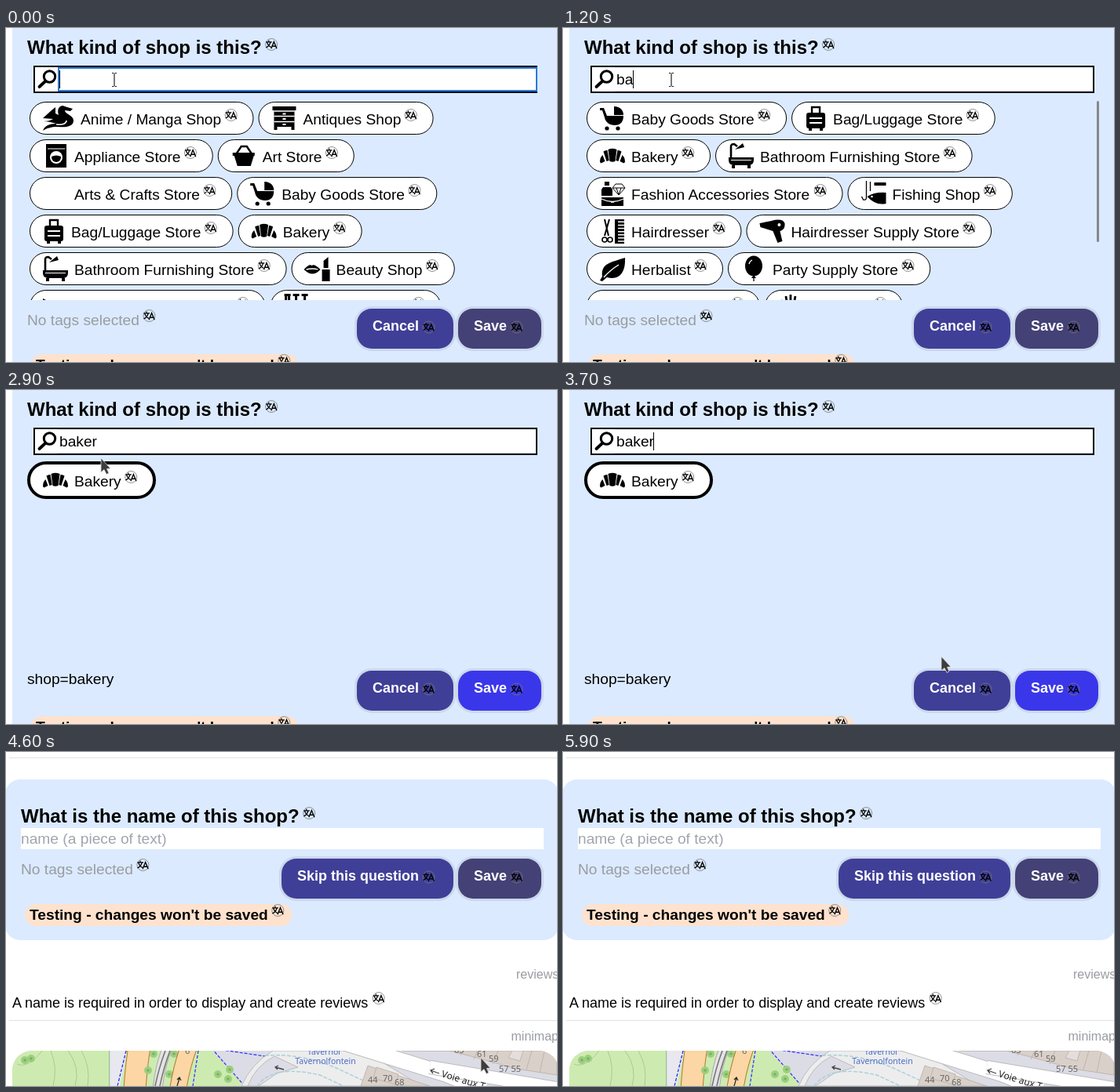
Animation of 702 by 426 pixels, one loop 6400 ms. Source, as an HTML page:

```html
<!DOCTYPE html>
<html lang="en">
<head>
<meta charset="utf-8">
<title>Picking a shop type</title>
<style>
html, body { margin: 0; width: 100%; height: 100%; overflow: hidden; background: #fff; }
svg { display: block; width: 702px; height: 426px; font-family: "Liberation Sans", Arial, sans-serif; }
text { white-space: pre; }
</style>
</head>
<body>
<svg id="stage" viewBox="0 0 702 426" xmlns="http://www.w3.org/2000/svg"></svg>
<script>
const LOOP = 6400, BODY = 19.2, BLUE = '#dbeafe', GREY = '#999ca1';
const ctx = document.createElement('canvas').getContext('2d');

function textWidth(s, size, weight = 400) {
  ctx.font = `${weight} ${size}px "Liberation Sans", Arial, sans-serif`;
  return ctx.measureText(s).width;
}
const text = (s, x, y, size = BODY, attrs = '') =>
  `<text x="${x}" y="${y}" font-size="${size}" ${attrs}>${s.replace('&', '&amp;')}</text>`;
const rect = (x, y, w, h, fill, r = 0, more = '') =>
  `<rect x="${x}" y="${y}" width="${w}" height="${h}" rx="${r}" fill="${fill}" ${more}/>`;
const path = (d, attrs = '') => `<path d="${d}" ${attrs}/>`;
const line = (d, color, w = 1, more = '') =>
  path(d, `fill="none" stroke="${color}" stroke-width="${w}" ${more}`);
const dot = (x, y, r, fill = '#000', more = '') =>
  `<circle cx="${x}" cy="${y}" r="${r}" fill="${fill}" ${more}/>`;
const group = (id, s, attrs = '') => `<g id="${id}" ${attrs}>${s}</g>`;
const move = (x, y, s) => `<g transform="translate(${x} ${y})">${s}</g>`;

// Language badge
const badge = (x, y) => move(x, y,
  dot(0, 0, 7.5, 'none', 'stroke="#777" stroke-width=".8"') +
  line('M-7-3.2H.6M-3.4-5.6V-3.2M-1.2-3Q-2.6 2-7 4M-5.8-3Q-4 2-.4 3.4', '#000', 1.2) +
  line('M-.3 5.2 3.2-3.4 6.8 5.2M1 2.2H5.5', '#000', 1.4));

function label(s, x, y, size = BODY, weight = 400, fill = '#000', dy = -12) {
  return text(s, x, y, size, `font-weight="${weight}" fill="${fill}"`) +
    badge(x + textWidth(s, size, weight) + 12.5, y + dy);
}

const button = (s, x, y, w, fill, id = '') =>
  rect(x - 3, y - 3, w + 6, 57, '#cbd8ec', 22, id && `id="${id}Ring"`) +
  rect(x, y, w, 51, fill, 19, id && `id="${id}"`) +
  label(s, x + 20, y + 28, 18, 700, '#fff', -4.5);

const notice = (x, y) => rect(x, y, 340, 28, '#fee2ce', 14) +
  label("Testing - changes won't be saved", x + 6, y + 20, BODY, 700);

// Shop icons in a 32 by 32 box
const white = (d, w = 1.5) => line(d, '#fff', w);
const ink = (d, w = 2) => line(d, '#000', w);
const icons = {
  dragon: path('M0 16 11 6l5-4 0 8 4 2c-2-7 0-11 5-12l6 2 7 2-3 3-7-1c0 5 11 6 11 13 0 8-10 9-20 8-8 0-15 2-19 5 2-6 8-9 17-9-6-2-12-3-16-3 5 0 9-1 12-3z') + white('M17 24q13 1 13-5'),
  drawers: path('M1 1h30v5H1zM3 6h26v21H3zM3 27h4v4H3zM25 27h4v4h-4z') + white('M3 7h26M3 13.5h26M3 20.5h26') + white('M14 10.5h4M14 17h4M14 24h4', 2),
  washer: path('M4 1h26v30H4z') + white('M6 7h22', 1) + dot(17, 18, 8, '#fff') + dot(17, 18, 6) + path('M11 17q6-3 12 0a6 6 0 0 0-12 0z', 'fill="#fff"'),
  basket: path('M2 12h28v4h-1l-4 13H8L4 16H2z') + ink('M7 13 13 4h7l6 9', 2.4),
  pram: path('M0 3h5l4 10h21c0 8-4 12-11 12s-12-4-13-10L3 6H0zM18 12V1c8 0 12 5 12 11z') + dot(9, 29, 2.6) + dot(23, 29, 2.6),
  luggage: rect(2, 9, 24, 20, '#000', 3) + ink('M9 9V2h10v7', 2.4) + white('M6 16h16M6 22h16', 1.8) + path('M5 28h4v4H5zM19 28h4v4h-4z'),
  croissant: path('M10.5 8q5.5-2.6 11 0l-2 15q-3.500 1.500-7 0zM4.500 10.500q2.500-2 5-1.500l2.200 13-3.200 1zM27.500 10.500q-2.500-2-5-1.500l-2.200 13 3.200 1zM0 24q0-6 3.500-9l3 8-5 2.500zM32 24q0-6-3.500-9l-3 8 5 2.500z'),
  bath: path('M0 18h32v3c0 5-3 7-6 7H7c-4 0-7-2-7-7zM4 28h4v4H4zM24 28h4v4h-4zM8 8 18 0l2 5z') + ink('M3 19V4q0-3 4-3l4 3', 2.6) + white('M3 21.5h26', 1),
  lips: path('M-1 17q7-8 10-5q3-3 11 5q-10 11-21 0zM22 17h10v15H22zM24 15V6l6-5v14z') + white('M2 17q8-2 15 0', 1.3),
  fashion: path('M4 8h10l2 3v8H2v-8zM6 1h6v5H6zM2 21h28v11H2z') + ink('M16 9l4-5h8l4 5-8 9zM16 9h16M21 9l3 9 3-9', 1) + white('M2 23q14 7 28 0M14 27h4', 1.3),
  fishing: ink('M7 0v21q0 4-4 3l-2-4M12 1v12', 1.3) + path('M17 2h15v4H17zM8 20q9-6 24-5v14q-13 3-24-9z') + dot(14, 20, 1.3, '#fff'),
  scissors: ink('M6 1 11 22M12 1 6 22', 2) + ink('M3 27a3 3 0 1 1 6 0a3 3 0 1 1-6 0M10 27a3 3 0 1 1 6 0a3 3 0 1 1-6 0', 1.6) + path('M19 1h4v31h-4z') + line('M27 1v31', '#000', 8, 'stroke-dasharray="2.6 1.500"'),
  dryer: path('M0 6 15 3q14-4 17 3 1 8-6 10l3 13-6 2-6-15-16-5z') + dot(25, 8, 2, '#fff'),
  leaf: path('M3 26C1 9 14 8 32 2c1 20-8 29-23 25l-6 5-3-1z') + white('M5 27Q14 17 24 11', 1.4),
  balloon: '<ellipse cx="16" cy="12.500" rx="11" ry="13"/>' + path('M13 28l3-4 3 4z') + ink('M16 27v5', 1.3) + white('M10 10q1-4 4-5', 1.3),
  spout: path('M0 6l4 2 8 3-6 2H0z'),
  tubes: path('M1 0h8v3H1zM12 0h8v3h-8zM23 0h8v3h-8z') + ink('M3 2v20M7 2v20M16 2v20M27 2v20', 3),
  hand: ink('M4 8l6 14M10 3l3 18M16 1v20M22 3l-3 18', 2.8)
};

// Each shop: name, icon, text offset
const shops = {
  anime: ['Anime / Manga Shop', 'dragon', 65], antiques: ['Antiques Shop', 'drawers'],
  appliance: ['Appliance Store', 'washer'], art: ['Art Store', 'basket'],
  crafts: ['Arts & Crafts Store', ''], baby: ['Baby Goods Store', 'pram'],
  bag: ['Bag/Luggage Store', 'luggage', 53], bakery: ['Bakery', 'croissant'],
  bath: ['Bathroom Furnishing Store', 'bath'], beauty: ['Beauty Shop', 'lips'],
  fashion: ['Fashion Accessories Store', 'fashion'], fishing: ['Fishing Shop', 'fishing'],
  hair: ['Hairdresser', 'scissors'], supply: ['Hairdresser Supply Store', 'dryer'],
  herbs: ['Herbalist', 'leaf'], party: ['Party Supply Store', 'balloon'],
  boat: ['Bookbinding Workshop.', 'spout'], brew: ['Brewing Tools', 'tubes'],
  perfume: ['Perfume Shop', ''], massage: ['Massage', 'hand']
};
function pill(key, x, y, thick) {
  const [name, icon, dx = 57] = shops[key];
  const w = dx + textWidth(name, BODY) + 41.3;
  const box = thick
    ? rect(x - 1, y - 1, w + 2, 44, '#fff', 22, 'stroke="#000" stroke-width="4"')
    : rect(x + .5, y + .5, w - 1, 41, '#fff', 20.5, 'stroke="#000"');
  return { w, svg: box + move(x + 17, y + 5, icons[icon] || '') + label(name, x + dx, y + 29) };
}
function list(id, rows) {
  let out = '';
  rows.forEach((row, i) => {
    let x = 30;
    for (const key of row.split(' ')) {
      const p = pill(key, x, 94 + 48 * i);
      out += p.svg;
      x += p.w + 6;
    }
  });
  return group(id, out, 'clip-path="url(#listClip)"');
}
const lists = {
  all: ['anime antiques', 'appliance art', 'crafts baby', 'bag bakery', 'bath beauty', 'boat brew'],
  b: ['baby bag', 'bakery bath', 'beauty fashion', 'fishing hair', 'supply', 'herbs party'],
  ba: ['baby bag', 'bakery bath', 'fashion fishing', 'hair supply', 'herbs party', 'perfume massage'],
  bak: ['bakery']
};

const typePage = group('typePage',
  rect(0, 0, 702, 426, '#fff') + rect(8, 0, 694, 426, BLUE) +
  label('What kind of shop is this?', 27, 33, 24, 700) +
  rect(36, 49, 640, 33, '#fff', 0, 'stroke="#000" stroke-width="2"') +
  line('M66 51H675M66 80.500H675', '#dfe6f0') +
  group('ring', rect(67, 51, 609, 29, '#fff', 0, 'stroke="#2a78d6" stroke-width="2"')) +
  dot(55.5, 62, 7.2, 'none', 'stroke="#000" stroke-width="3"') +
  line('M50 68 42.500 75', '#000', 3.8, 'stroke-linecap="round"') +
  text('', 68, 72, BODY, 'id="query"') + rect(68, 54, 1, 23, '#000', 0, 'id="caret"') +
  Object.entries(lists).map(([k, rows]) => list('list_' + k, rows)).join('') +
  group('chosen', pill('bakery', 30, 94, true).svg + text('shop=bakery', 27, 375)) +
  rect(680, 93, 3, 180, '#85888d', 1.5, 'id="bar"') +
  group('none', label('No tags selected', 27, 379, BODY, 400, GREY)) +
  button('Cancel', 447, 358, 123, '#403f98') + button('Save', 576, 358, 106, '#444176', 'save') +
  notice(32, 416));

// Small map
const tree = (x, y) => dot(x, y, 5, '#9bcf7f') + dot(x, y, 1.8, '#7fae62');
const number = (s, x, y) => text(s, x, y, 11, 'fill="#666" font-family="Noto Sans, sans-serif"');
const road = (d, w, fill, edge) => line(d, edge, w) + line(d, fill, w - 2);
const place = 'fill="#4c6cc8" text-anchor="middle" font-family="Noto Sans, sans-serif"';
const house = (d, fill = '#d9d0c9') => path(d, `fill="${fill}" stroke="#b9aea4" stroke-width=".8"`);
const minimap = group('minimap',
  rect(8, 381, 694, 45, '#dcdce6') +
  path('M8 381H131V426H8z', 'fill="#cdebb0"') +
  line('M57 381Q66 402 60 426M79 381Q95 402 88 426M96 381Q108 402 104 426M14 398Q28 404 46 381', '#a9bd8b', .8) +
  tree(24, 393) + tree(32, 391) + line('M131.500 381V426', '#8fc58f') +
  path('M133 381H157L147 426H133z', 'fill="#e8e8ee"') +
  path('M154 381H245L238 426H145z', 'fill="#cdebb0"') +
  line('M153 381 142 426', '#2a2aff', 1.3, 'stroke-dasharray="4 2"') +
  road('M170 376 Q166 400 164 431', 29, '#fcd6a4', '#b07a2a') +
  tree(188, 385) + tree(181, 406) + tree(208, 411) + tree(214, 385) +
  road('M206 376Q196 400 193 431', 13, '#e4e4e4', '#aaa') +
  line('M203 381Q195 402 190 426M209 381Q201 402 196 426', '#777', 1.6) +
  road('M233 376Q224 400 219 431', 22, '#fcd6a4', '#b07a2a') +
  line('M218 426 221 416M218 418l3-3 2 4', '#222', 1.2) + number('6', 228, 385) +
  path('M245 381H262L300 420V426H238z', 'fill="#cdebb0"') +
  line('M245 381 238 426M262 378 304 426M262 378 330 388', '#2a2aff', 1.2, 'stroke-dasharray="4 2"') +
  tree(270, 411) + tree(285, 405) + tree(283, 417) +
  path('M340 381H455L530 426H300Q312 398 340 381z', 'fill="#ededed" stroke="#bbb"') +
  path('M342 388 372 402 345 410 322 426H308Q318 400 342 388z', 'fill="#dcdce6" stroke="#bbb"') +
  line('M330 387Q380 384 425 405L470 426M320 426Q340 398 400 412L430 426', '#a5d0d8', 1.4, 'stroke-dasharray="5 2"') +
  line('M343 402 354 405M347 400l-4 2 3 3', '#444', 1.3) +
  house('M452 426 461 400 540 426z') + house('M472 402 500 411 496 424 468 416z') +
  house('M505 381H702V412L650 404 600 390 565 381z') +
  house('M640 390 645 381H659L655 394z', '#e3dedb') +
  line('M583 381 579 387M601 381 596 392M627 381 620 398M670 381 663 405M686 381 680 409', '#b9aea4', .8) +
  road('M425 369 560 411 610 431', 21, '#fff', '#bbb') + road('M540 402 720 432', 18, '#fff', '#bbb') +
  line('M541 406 552 410M546 404l-5 2 3 4', '#444', 1.3) +
  text('Tavernol', 405, 386, 10.5, place) + text('Tavernolfontein', 407, 398, 10.5, place) +
  number('44', 461, 422) + number('70', 480, 420) + number('68', 495, 425) + number('63', 571, 384) +
  number('61', 600, 389) + number('59', 615, 395) + number('57 55', 628, 408) +
  text('Voie aux T', 554, 414, 12, 'transform="rotate(17 554 414)" font-family="Noto Sans, sans-serif" fill="#222"'),
  'clip-path="url(#mapClip)"');

const namePage = group('namePage',
  rect(0, 0, 702, 426, '#fff') + line('M4 7.500H702M4 342.500H702', '#e2e2e2') +
  rect(-1, 35, 705, 205, BLUE, 19) +
  label('What is the name of this shop?', 19, 90, 24, 700) +
  rect(19, 97, 666, 27, '#fff') + text('name (a piece of text)', 19, 117, BODY, 'fill="#a0a5ad"') +
  label('No tags selected', 19, 156, BODY, 400, GREY) +
  button('Skip this question', 351, 136, 219, '#403f98') + button('Save', 576, 136, 106, '#444176') +
  notice(24, 194) +
  text('reviews', 650, 289, 16, `fill="${GREY}"`) +
  label('A name is required in order to display and create reviews', 8, 326, 18) +
  text('minimap', 643.5, 368, 16, `fill="${GREY}"`) + minimap);

// Large street map seen while the panel fades in
const street = (s, x, y, size, turn) => text(s, x, y, size,
  `transform="rotate(${turn} ${x} ${y})" font-family="Noto Sans, sans-serif" fill="#333"`);
const bigMap = group('bigMap',
  rect(0, 0, 702, 426, '#f4f2ee') +
  path('M0 240 Q70 225 110 70Q130 40 200 50L702 190V426H0z', 'fill="#fbfaf2"') +
  line('M0 260Q75 240 92 100Q100 45 200 50L380 115 412 18 640 95 702 112', '#bbb', 4) +
  path('M60 426 118 235Q125 222 190 226L702 395V426z', 'fill="#ebe5df" stroke="#bbb" stroke-width="4"') +
  path('M190 426 235 295 560 400 552 426z', 'fill="#dfd6cf"') +
  line('M90 102Q130 80 230 105L702 235M190 95 702 183', '#8fc4f5', 6, 'stroke-dasharray="19 11"') +
  line('M12 147 42 151M52 157 76 155M86 164 96 167', '#5a4fd0', 6, 'stroke-dasharray="8 4"') +
  dot(500, 12, 29, '#bfe0a0') + dot(500, 12, 6, '#c7a878') + dot(605, 48, 28, '#bfe0a0') + dot(605, 48, 6, '#c7a878') +
  line('M195 174H152M168 165 152 174 168 183', '#777', 7) +
  street('Place de Hulvane - Hulvaanseplein', 213, 191, 48, 18.5) +
  street('Hulvaan', 615, 74, 42, 5) + street('Hul', 672, 18, 42, 5) +
  path('M132 308H153V330H132zM129 306 142 300 156 306z', 'fill="#555"') + path('M690 106h12v30h-12z', 'fill="#555"'));

const arrow = path('M0 0V18L4 14.500 7 20.500 10 19 7.500 13.500 12 13z', 'fill="#3d3d3d" stroke="#ddd" stroke-width=".8"');
const pointer = path('M-2 1Q0-1 2 1L4 8Q7 6 8 8 11 7 11.500 9 14 8 14 11L13 20H3Q-3 16-6 11-5 8-2 11L0 12z', 'fill="#444" stroke="#ddd" stroke-width=".8"');
const beam = line('M-3-8.500H3M-3 8.500H3M0-8.500V8.500', '#fff', 2.6) + line('M-3-8.500H-.6M.6-8.500H3M-3 8.500H-.6M.6 8.500H3M0-8V8', '#222', 1.2);

const stage = document.getElementById('stage');
stage.innerHTML = `<defs><clipPath id="listClip">${rect(9, 85, 693, 262, '#000')}</clipPath>
  <clipPath id="mapClip">${rect(8, 381, 696, 90, '#000', 25)}</clipPath></defs>` +
  bigMap + rect(0, 0, 702, 426, '#fff', 0, 'id="veil"') + typePage + namePage +
  group('cursor', group('arrow', arrow) + group('pointer', pointer) + group('beam', beam));

const $ = id => document.getElementById(id);
const show = (id, on) => $(id).setAttribute('display', on ? 'inline' : 'none');
const set = (id, name, value) => $(id).setAttribute(name, value);

// Mouse positions, one every 100 ms from 2900
const trail = [[121, 87], [96, 104], [90, 126], [116, 170], [190, 226], [300, 282], [409, 314],
  [436, 323], [482, 340], [532, 362], [574, 382], [594, 393], [601, 392], [603, 390]];

function cursorAt(t) {
  if (t < 2900) return [138, 66, 'beam'];
  if (t < 4600) {
    const [x, y] = trail[Math.min(Math.floor((t - 2900) / 100), trail.length - 1)];
    const onPill = x < 191 && y > 91 && y < 139;
    const onSave = x > 573 && y > 355;
    return [x, y, onPill || onSave ? 'pointer' : 'arrow', onSave];
  }
  if (t < 5400) return [605, 390, 'arrow'];
  return [254, 104.5, t < 5900 ? 'beam' : ''];
}

function draw(now) {
  const t = Math.floor((now % LOOP) / 100) * 100;
  const typing = t < 4600;
  show('typePage', typing);
  show('namePage', !typing);

  const [x, y, kind, onSave] = cursorAt(t);
  set('cursor', 'transform', `translate(${x} ${y})`);
  for (const k of ['arrow', 'pointer', 'beam']) show(k, k === kind);

  if (typing) {
    const typed = [900, 1200, 1500, 1700, 2000].filter(k => t >= k).length;
    const query = 'baker'.slice(0, typed);
    const picked = t >= 2100;
    const current = picked ? '' : t < 1000 ? 'all' : typed > 2 ? 'bak' : query;
    $('query').textContent = query;
    set('caret', 'x', Math.floor(68 + textWidth(query, BODY)));
    show('caret', t < 2100 || (t >= 3400 && t < 4400));
    show('ring', t < 900);
    show('bar', t >= 1000 && t < 1500);
    set('bar', 'height', typed > 1 ? 180 : 130);
    for (const k in lists) show('list_' + k, k === current);
    show('chosen', picked);
    show('none', !picked);
    set('save', 'fill', picked ? '#3a37ea' : '#444176');
    set('saveRing', 'fill', onSave ? '#3a37ea' : '#cbd8ec');
  } else {
    const p = t < 5400 ? 1 : Math.min((t - 5400) / 500, 1);
    set('namePage', 'opacity', p);
    set('veil', 'opacity', 1 - (1 - p) ** 2);
  }
}

const start = performance.now();
function tick() {
  draw(performance.now() - start);
  requestAnimationFrame(tick);
}
tick();
</script>
</body>
</html>
```
